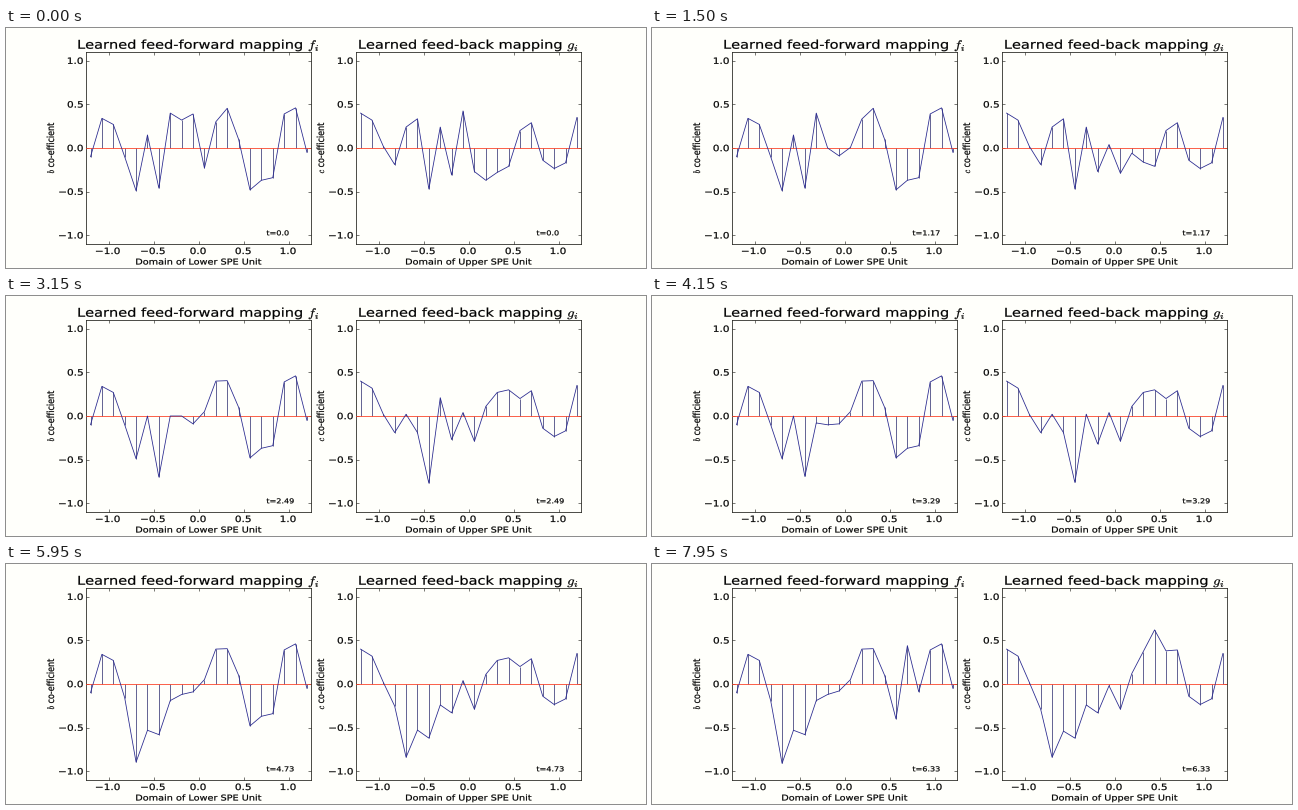
Recreate the animation shown at these times as a matplotlib script. Size 640 px wide and 240 px high, loop 8000 ms.

```python
import numpy as np
import matplotlib.pyplot as plt
from matplotlib.animation import FuncAnimation
from matplotlib.patches import PathPatch
from matplotlib.textpath import TextPath
from matplotlib.transforms import Affine2D

plt.rcParams["font.family"] = "DejaVu Sans"
plt.rcParams["mathtext.fontset"] = "cm"

W, H, DPI = 640, 240, 100
FRAMES, STEP = 160, 50
PX = 72 / DPI                       # one pixel in points
# an 11 x 5 inch page squeezed onto the stage
SX, SY = W / 11 / 72, H / 5 / 72
TOP, WIDE, TALL = 24, 225.45, 192
PAPER, INK, LINE, STEM, ZERO = "#fffffb", "#23231e", "#2a2a90", "#40407c", "#fa3c22"

XS = np.linspace(-1.2, 1.2, 20)

# The learner makes four sweeps and pulls each point it visits to a new height.
SWEEPS = [(0, 50), (45, 63), (63, 130), (132, 159)]

FWD = [-.10, .34, .27, -.10, -.49, .15, -.46, .40, .32, .39,
       -.23, .30, .455, .10, -.48, -.37, -.34, .39, .46, -.05]
FWD_GOALS = [                       # point: height, in order of the visits
    {9: -.09, 8: 0, 10: .05, 11: .40, 12: .405},
    {7: 0, 6: -.70, 5: 0},
    {8: -.12, 7: -.19, 6: -.58, 5: -.53, 4: -.91, 3: -.19},
    {9: -.08, 14: -.40, 16: -.09, 15: .44},
]

BACK = [.40, .32, .02, -.19, .24, .335, -.47, .24, -.31, .425,
        -.27, -.37, -.28, -.21, .20, .29, -.14, -.235, -.17, .35]
BACK_GOALS = [
    {9: .04, 8: -.27, 10: -.29, 11: .11, 12: .27, 13: .30},
    {7: .21, 6: -.77, 5: -.19, 4: .02},
    {8: -.33, 7: -.24, 6: -.62, 4: -.84, 5: -.54, 3: -.29},
    {9: -.02, 11: .12, 12: .37, 13: .62, 14: .38, 15: .39},
]

fig = plt.figure(figsize=(W / DPI, H / DPI), dpi=DPI, facecolor=PAPER)


def ease(k):
    k = np.clip(k, 0, 1)
    return k * k * (3 - 2 * k)


def heights(base, goals, n):
    ys = np.array(base, float)
    for (start, end), visits in zip(SWEEPS, goals):
        dwell = 0.4 * (end - start)
        arrivals = np.linspace(start, end - dwell, len(visits))
        for at, (i, goal) in zip(arrivals, visits.items()):
            ys[i] += (goal - ys[i]) * ease((n - at) / dwell)
    return ys


def put(x, y, text, size, ha="center", va="baseline", angle=0):
    """Place text in stage pixels, y counted from the top."""
    path = TextPath((0, 0), text, size=size)
    box = path.get_extents()
    dx = {"left": 0, "center": (box.x0 + box.x1) / 2, "right": box.x1}[ha]
    dy = {"baseline": 0, "center": (box.y0 + box.y1) / 2}[va]
    place = (Affine2D().translate(-dx, -dy).rotate_deg(angle).scale(SX, SY)
             .translate(x, H - y).scale(1 / W, 1 / H))
    return fig.add_artist(PathPatch(path, fc="black", ec="black", lw=0.2 * PX,
                                    transform=place + fig.transFigure))


def clock(n):
    return "t=0.0" if n == 0 else f"t={0.04 * n - 0.03:.2f}"


class Panel:
    def __init__(self, left, title, xlabel, ylabel, base, goals):
        self.base, self.goals = base, goals
        ax = fig.add_axes([left / W, 1 - (TOP + TALL) / H, WIDE / W, TALL / H],
                          facecolor=PAPER)
        ax.set(xlim=(-1.25, 1.25), ylim=(-1.1, 1.1))
        ticks = np.arange(-2, 3) / 2
        ax.set_xticks(ticks, [])
        ax.set_yticks(ticks, [])
        ax.tick_params(direction="in", top=True, right=True, color=INK,
                       length=3 * PX, width=0.6 * PX)
        for spine in ax.spines.values():
            spine.set(linewidth=0.8 * PX, edgecolor=INK)

        self.stems = ax.vlines(XS, 0, base, color=STEM, lw=0.8 * PX)
        ax.axhline(0, color=ZERO, lw=0.8 * PX, zorder=3)
        self.line, = ax.plot(XS, base, color=LINE, lw=0.8 * PX, zorder=4)

        mid = left + WIDE / 2
        for v in ticks:
            label = f"{v:.1f}".replace("-", "\u2212")
            put(mid - 0.7 + v * WIDE / 2.5, 226, label, 13)
            put(left - 3.2, TOP + TALL / 2 - v * TALL / 2.2, label, 13,
                "right", "center")
        put(mid - 0.5, 20.7, title, 18)
        put(mid, 236.5, xlabel, 12)
        put(left - 32, 120, ylabel, 12, angle=90)
        self.time = put(mid + 0.75 * WIDE / 2.5, 207.3, clock(0), 10, "left")

    def show(self, n):
        ys = heights(self.base, self.goals, n)
        self.line.set_ydata(ys)
        self.stems.set_segments([[(x, 0), (x, y)] for x, y in zip(XS, ys)])
        self.time.set_path(TextPath((0, 0), clock(n), size=10))


panels = [
    Panel(80, "Learned feed-forward mapping $f_i$", "Domain of Lower SPE Unit",
          "$b$ co-efficient", FWD, FWD_GOALS),
    Panel(350, "Learned feed-back mapping $g_i$", "Domain of Upper SPE Unit",
          "$c$ co-efficient", BACK, BACK_GOALS),
]


def update(n):
    for panel in panels:
        panel.show(n)
    return []


anim = FuncAnimation(fig, update, frames=FRAMES, interval=STEP,
                     repeat=True, repeat_delay=0, blit=False)
plt.show()
```
